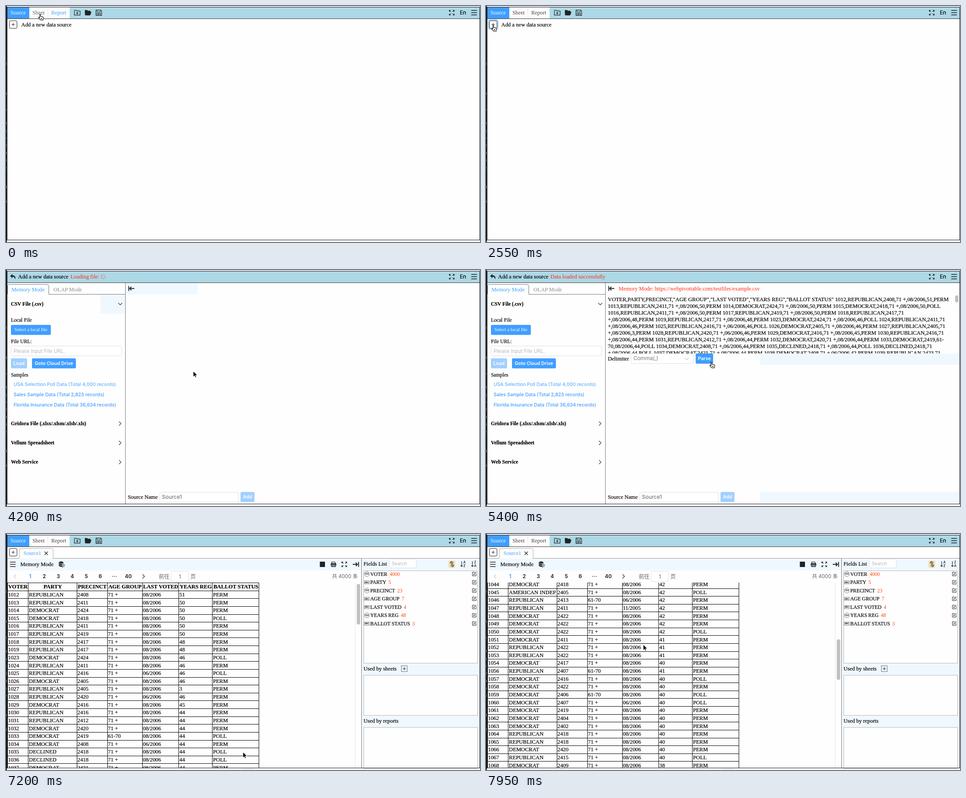
These frames come from a looping animation (1058 px wide and 529 px high, 8 s). An HTML page:

```html
<!DOCTYPE html>
<html lang="en">
<head>
<meta charset="utf-8">
<style>
html, body { margin: 0; width: 100%; height: 100%; overflow: hidden; background: #fefefe; }
#stage { display: block; width: 100vw; height: 100vh; font-family: 'Liberation Serif', 'Times New Roman', serif; }
text { white-space: pre; }
text:not([fill]) { stroke: #000; stroke-width: .2px; }
tspan { stroke: none; }
.sans { font-family: Inter, 'Noto Sans CJK SC', 'Noto Sans CJK JP', 'Noto Sans CJK', sans-serif; }
</style>
</head>
<body>
<svg id="stage" viewBox="0 0 1058 529"></svg>
<script>
const LOOP = 8000, STEP = 150, ROW = 17.63;
const BLUE = '#409eff', PALE = '#a0cfff', RED = '#ff2a10', ALICE = '#f0f8ff', INK = '#222', GREY = '#dcdfe6';
const stage = document.getElementById('stage');

// ---- data: party, precinct, flags (a: 61-70, s: June, n: November, L: poll), years
const PARTY = { R: 'REPUBLICAN', D: 'DEMOCRAT', C: 'DECLINED', A: 'AMERICAN INDEP' };
const HEADS = ['VOTER', 'PARTY', 'PRECINCT', 'AGE GROUP', 'LAST VOTED', 'YEARS REG', 'BALLOT STATUS'];
const COLS = [0, 46.5, 155, 223, 301, 382.5, 457.5, 561.5];
const rows = ('R08P51 R11P50 D24P50 D18L50 R11P50 R19P50 R17P48 R17P48 D24L46 R11P46 R16sL46 D05P46 R05P3 R20sP46 ' +
  'D16P45 R16P44 R12P44 D20P44 D19aL44 D08sP44 C18L44 C18L44 D21P44 D08sP42 R23P42 D22P42 R11P42 D17P42 R08P42 ' +
  'D18P42 A05L42 R13asP42 R11nP42 D22P42 D22P42 D22L42 D11P41 R22P41 R22P41 D17P40 R07aP41 D16L40 D22P40 D06aL40 ' +
  'D07sL40 D19P40 D04P40 D02P40 R18P40 R18P40 D20P40 R15L40 D09P38 R12P38').split(' ').map((code, i) => {
  const [, party, precinct, flags, years] = code.match(/(\w)(\d\d)(\D+)(\d+)/);
  const has = f => flags.includes(f);
  return [1012 + i + (i > 7 ? 3 : 0) + (i > 39 ? 1 : 0), PARTY[party], '24' + precinct, has('a') ? '61-70' : '71 +',
    has('n') ? '11/2005' : has('s') ? '06/2006' : '08/2006', years, has('L') ? 'POLL' : 'PERM'];
});
const csvLines = (HEADS.map(h => h.includes(' ') ? `"${h}"` : h).join() + rows.slice(0, 28).map(row => {
  const [id, party, precinct, age, ...rest] = row;
  const wrapped = [1018, 1024, 1027, 1030, 1033, 1036, 1039].includes(id);
  const group = wrapped ? age.replace(/ |(?<=-)/, '\n') : age;
  return ([1013, 1016].includes(id) ? '\n' : ' ') + [id, party, precinct, group, ...rest].join();
}).join('')).split('\n').slice(0, 9);

// ---- drawing helpers; text y is the middle of the line
const text = (x, y, s, o = '', size = 12.32) =>
  `<text x="${x}" y="${y + size * .33}" ${o} font-size="${size}">${s}</text>`;
const sans = (x, y, s, o = '', size = 10.5) => text(x, y, s, 'class="sans" ' + o, size);
const rect = (x, y, w, h, fill, o = '') =>
  `<rect x="${x}" y="${y}" width="${w}" height="${h}" fill="${fill}" ${o}/>`;
const line = (x, y, w, h, fill = '#333') => rect(x, y, w, h, fill, 'shape-rendering="crispEdges"');
const path = (x, y, d, o = '') =>
  `<path transform="translate(${x} ${y})" d="${d}" ${o} fill="none" stroke="${INK}" stroke-width="1.2"/>`;
const field = (x, y, w, h, stroke = GREY) => rect(x + .5, y + .5, w - 1, h - 1, '#fff', `rx="3" stroke="${stroke}"`);
const mid = 'text-anchor="middle" ';
const fill = c => `fill="${c}" `;
const button = (x, y, w, s, color = BLUE, h = 22.5) =>
  rect(x, y, w, h, color, 'rx="2.5"') + sans(x + w / 2, y + h / 2, s, mid + fill('#fff') + 'font-weight="600"');
const chevron = (x, y, turn = 0, color = INK) =>
  `<path transform="translate(${x} ${y}) rotate(${turn})" d="M-2.2 -4.5L2.2 0L-2.2 4.5" fill="none" stroke="${color}" stroke-width="1.1"/>`;
const burger = (x, y) => path(x, y, 'M0 -5H12.5M0 0H12.5M0 5H12.5', 'stroke-width="1.5"');
const expand = (x, y) => path(x, y, 'M-2 -2L-5.5 -5.5M-5.5 -2.5V-5.5H-2.5M2 -2L5.5 -5.5M2.5 -5.5H5.5V-2.5M-2 2L-5.5 5.5M-5.5 2.5V5.5H-2.5M2 2L5.5 5.5M2.5 5.5H5.5V2.5');
const plus = (x, y) => path(x, y, 'M-3.5 0H3.5M0 -3.5V3.5', 'stroke-width="1"');
const clamp = v => Math.max(0, Math.min(1, v));
const ease = v => (v = clamp(v), v * v * (3 - 2 * v));

function table(x, top, bottom, scroll) {
  const h = bottom - top;
  let out = '';
  for (let r = 0; r <= rows.length; r++) {
    const y = r * ROW - scroll;
    if (y < -ROW || y > h) continue;
    out += line(0, Math.round(y), 562, 1, '#000');
    HEADS.forEach((head, c) => out += r
      ? text(COLS[c] + 1.5, y + 9.2, rows[r - 1][c])
      : text((COLS[c] + COLS[c + 1] + 1) / 2, y + 9.2, head, mid + 'font-weight="700"'));
  }
  COLS.forEach(c => out += line(Math.floor(c), 0, 1, h, '#000'));
  return `<svg x="${x}" y="${top}" width="563" height="${h}">${out}</svg>`;
}

function pager(x, y) {
  const marks = ['1', '2', '3', '4', '5', '6', '···', '40'];
  return chevron(x, y, 180, '#c0c4cc') + chevron(x + 287, y) + marks.map((s, i) =>
    sans(x + 34 + 31.3 * i, y, s, mid + 'font-weight="700" ' + fill(i ? '#303133' : BLUE), 11.44)).join('');
}

function header() {
  return rect(3, 3, 1054, 25, '#add8e6') + line(3, 28, 1054, 1) + expand(995, 15) +
    sans(1013, 15, 'En', '', 11.8) + burger(1038.5, 15);
}

function mainBar(sheetColor = '#444', reportColor = '#444') {
  return header() + rect(3, 3, 49, 25, BLUE) + rect(52, 3, 90, 25, '#fefefe') + line(93, 3, 1, 25, GREY) +
    text(10, 15, 'Source', fill('#fff')) + text(59, 15, 'Sheet', fill(sheetColor)) + text(101, 15, 'Report', fill(reportColor)) +
    path(152, 9, 'M.6 1.5Q.6 .6 1.5 .6H5L6.5 2.2H13.5V11.4H.6ZM4.2 6.8H10M7.1 4V9.7') +
    path(176, 9, 'M.6 10V.8H5L6.5 2.3H12V4.5H4L1.2 11.4H11.4L14 4.8H4', `fill="${INK}"`) +
    path(200, 8.5, 'M.6 1.5Q.6 .6 1.5 .6H11.5L13.6 2.7V12.6H.6ZM3 .8V4.5H10.7V.8M3 12.5V7.3H11.2V12.5M5 9H9M5 10.8H9', 'stroke-width="1.1"');
}

const addButton = (focus, y = 41.5) =>
  (focus ? rect(5.5, y - 10.5, 21, 20.5, 'none', 'rx="4" stroke="#a8cbf5" stroke-width="2.5"') : '') +
  rect(7.5, y - 8.5, 17, 17, '#fefefe', `rx="2.5" stroke="${INK}"`) + plus(16, y);

function startPage(t) {
  const overSheet = t >= 150 && t < 600;
  return mainBar(overSheet ? BLUE : t < 150 ? '#606266' : '#444', t < 150 ? BLUE : '#444') +
    addButton(t >= 2250) + text(34, 41.5, 'Add a new data source');
}

function samplePanel(t) {
  const open = ease((t - 3150) / 450), h = 225 * open;
  const body = text(11, 112.5, 'Local File', '', 11.44) + rect(11, 123, 89, 22.5, BLUE, 'rx="2.5"') +
    text(55.5, 134, 'Select a local file', mid + fill('#fff') + 'font-weight="500"', 10.56) +
    text(11, 160, 'File URL:', '', 11.44) + field(11, 170, 247.5, 23) +
    sans(17, 182, 'Please input File URL.', fill('#b4b8c0'), 11.2) +
    button(11, 198, 36, 'Load', PALE) + button(58, 198, 98, 'Goto Cloud Drive') +
    text(11, 235, 'Samples', '', 11.44) +
    ['USA Selection Poll Data (Total 4,000 records)', 'Sales Sample Data (Total 2,823 records)',
      'Florida Insurance Data (Total 36,634 records)'].map((s, i) => sans(17, 256.5 + 22.8 * i, s,
      'font-weight="500" ' + fill(!i && t >= 3600 && t < 5550 ? '#66b1ff' : BLUE), 10.56)).join('');
  const sections = ['Gridora File (.xlsx/.xlsm/.xlsb/.xls)', 'Vellum Spreadsheet', 'Web Service'];
  return text(11, 76, 'CSV File (.csv)', 'font-weight="700"', 11.44) + chevron(255, 76, 90 * open) +
    `<svg x="0" y="98" width="266" height="${h}" viewBox="0 98 266 ${h || 1}">${h ? body : ''}</svg>` +
    sections.map((s, i) => text(11, 119.3 + h + 43.2 * i, s, 'font-weight="700"', 11.44) +
      chevron(254.5, 119.3 + h + 43.2 * i)).join('');
}

function spinner(x, y, t) {
  let out = '';
  for (let i = 0; i < 8; i++) out += `<path transform="translate(${x} ${y}) rotate(${i * 45 + t * .18})" d="M0 -2.8V-5.5" stroke="${RED}" stroke-opacity="${.5 + i / 16}"/>`;
  return out;
}

function loadPage(t) {
  const loading = t >= 3900 && t < 4650, loaded = t >= 4650, parsed = t >= 5700;
  let out = header() + path(9, 9, 'M5 .5L.8 4.5L5 8.5V6Q10.5 5.5 11.5 11Q13 3.3 5 3.2Z', `fill="${INK}" stroke-width=".8"`) +
    text(27, 15, 'Add a new data source');
  if (loading) out += text(144, 15, 'Loading file:', fill(RED)) + spinner(217, 15, t - 4200);
  if (loaded && !parsed) out += text(144, 15, 'Data loaded successfully', fill(RED));
  if (t >= 4200 && !loaded) out += rect(211, 55, 55, 43, ALICE) + rect(268, 29, 160, 25.5, ALICE);
  if (loaded && !parsed) out += rect(612, 187, 445, 26, ALICE) + rect(612, 497, 445, 23, ALICE);
  out += line(95, 54, 172, 1, '#777') + line(266, 29, 1, 495, '#777') +
    path(0, 0, 'M3.5 54V36Q3.5 32.5 7 32.5H92Q95.5 32.5 95.5 36V54', 'stroke="#777" stroke-width="1"') +
    text(12, 44, 'Memory Mode', fill(BLUE)) + text(106, 44, 'OLAP Mode', fill('#8a8a8a')) + samplePanel(t) +
    path(273, 36, 'M1 0V11M13.5 5.5H3M7 1.5L3 5.5L7 9.5', 'stroke-width="1.8"');
  if (loaded) {
    out += text(296, 42, 'Memory Mode: https://webpivottable.com/testfiles/example.csv', fill(RED)) +
      `<svg x="268" y="55" width="778" height="132" viewBox="268 55 778 132">${csvLines.map((s, i) => text(272, 66.3 + 15 * i, s)).join('')}</svg>` +
      rect(1047, 57, 7.5, 15.5, '#c1c1c1', 'rx="3.5"') + text(272, 198.5, 'Delimiter') + field(323, 187, 140.5, 23) +
      sans(329, 198.5, 'Comma(,)', fill('#777'), 11.9) + chevron(448, 199, 90, '#c0c4cc') +
      button(468, 187, 39, 'Parse', parsed ? PALE : BLUE, 23);
  }
  if (parsed) out += sans(272, 227, '共 4000 条', fill('#606266'), 11.2) + pager(345, 227) + table(267.5, 242, 497, 0) +
    rect(1047, 244, 7.5, 32, '#c1c1c1', 'rx="3.5"');
  return out + text(272, 509, 'Source Name') + field(343, 497.5, 176.5, 23) +
    (t >= 3900 ? sans(348, 509, 'Source1', fill('#606266'), 12) : '') + button(523.5, 497.5, 31, 'Add', parsed ? BLUE : PALE);
}

function fieldsPanel() {
  const arrow = 'M3 0V12M.5 9.5L3 12L5.5 9.5';
  const box = (y, h) => rect(798.5, y + .5, 254, h, '#fefefe', 'stroke="#b8b8b8"');
  const sorter = (x, a, b) => path(x, 61, arrow) + sans(x + 7, 64, a, '', 7) + sans(x + 7, 72, b, '', 7);
  const counts = [4000, 5, 23, 7, 4, 48, 3];
  let out = rect(794, 55, 263, 469, ALICE) + line(793, 55, 1, 469, '#777') + text(798, 67, 'Fields List') +
    field(855, 56, 61.5, 20.5) + sans(861, 66.5, 'Search', fill('#b4b8c0'), 10.3) +
    rect(987.5, 60, 15, 15.5, '#f5deb3') + path(990, 61.5, 'M4 12V0L.8 4M7 0V12L10.2 8') +
    sorter(1014, 'A', 'Z') + sorter(1038, 'Z', 'A') + box(82, 207) + box(316, 90) + box(433, 92) +
    text(798, 301.5, 'Used by sheets') + rect(882.5, 295.5, 13, 13, 'none', `stroke="${INK}" stroke-dasharray="2 1.3"`) + plus(889, 302) +
    text(798, 419, 'Used by reports');
  HEADS.forEach((head, i) => {
    const y = 89.8 + 18.5 * i, number = [0, 2, 5].includes(i);
    out += (number ? `<circle cx="805.5" cy="${y}" r="5.5" fill="none" stroke="#555" stroke-width=".8"/>`
      : rect(800, y - 3.5, 11, 7, 'none', 'stroke="#555" stroke-width=".8"')) +
      sans(805.5, y, number ? '123' : 'abc', mid, 4.8) +
      text(813, y, `${head}<tspan dx="5" fill="#ff4500">${counts[i]}</tspan>`, '', 11.44) +
      path(1040.5, y - 5, 'M5.5 .8H.6V9H8.8V4.5M3.2 6.5L3.5 4.8L8 .3L9.3 1.6L4.8 6.1Z', 'stroke-width="1"');
  });
  return out;
}

function sourcePage(t) {
  const scroll = 534 * clamp((t - 7300) / 650);
  return mainBar() + addButton(false, 41) + rect(3, 55, 790, 26.5, ALICE) +
    line(3, 54, 26, 1, '#999') + line(105, 54, 952, 1, '#999') +
    path(0, 0, 'M29.5 54.5V36Q29.5 32.5 33 32.5H101.5Q105 32.5 105 36V54.5', 'stroke="#aaa" stroke-width="1"') +
    text(39, 43.5, 'Source1', fill(BLUE), 12.1) + path(86, 39.5, 'M0 0L7.5 7.5M7.5 0L0 7.5') +
    burger(9, 68) + text(32, 68, 'Memory Mode') +
    path(118.5, 61.5, 'M0 2Q4.5 -1.2 9 2V5.5H6V11.5Q2 11.5 0 9.5Z', `fill="${INK}"`) +
    path(118.5, 61.5, 'M0 3.8Q4.5 6 9 3.8M0 7.4Q3 9 6 8.4', 'stroke="#f0f8ff" stroke-width=".9"') +
    path(125, 68.5, 'M0 1.5H5.5L4 0M5.5 4.5H0L1.5 6', 'stroke-width="1.1"') +
    rect(700.5, 62, 11.5, 12, INK) +
    path(725, 62, 'M2 4V.8H8.5L10 2.3V4M.6 4.5H11.4V9H.6ZM2 9V11.4H10V9', 'stroke-width="1.3"') + rect(726, 66.5, 10, 2.5, INK) +
    expand(755, 68) + path(774, 62.5, 'M13 0V11M0 5.5H10.5M6.5 1.5L10.5 5.5L6.5 9.5', 'stroke-width="1.8"') +
    pager(20, 95) + sans(341, 96.5, '前往', fill('#606266'), 12) + field(368, 83, 39.5, 24) +
    sans(388, 96, '1', mid + fill('#606266'), 11.4) + sans(411.5, 96.5, '页', fill('#606266'), 12) +
    sans(728, 95, '共 4000 条', fill('#606266'), 11.2) + table(3, 109, 524, scroll) +
    line(779, 110, 1, 414, '#e4e4e4') + rect(783, 112 + scroll * .2322, 7.5, 91, '#c1c1c1', 'rx="3.7"') +
    fieldsPanel() + rect(525, 526, 29, 3, '#ececec', 'rx="1.5"');
}

// ---- pointer: time, x, y of the tip
const TRACK = [[300, 76, 18], [750, 40, 22], [900, 40, 22], [1950, 16, 43], [2700, 16, 43], [3000, 110, 76], [3300, 110, 76],
  [3600, 130, 256], [3750, 130, 256], [4050, 380, 231], [4200, 418, 227], [4500, 418, 227], [5250, 503, 206], [5550, 503, 206],
  [6150, 539, 417], [6600, 537, 511], [6750, 537, 511], [7200, 529, 489], [7500, 351, 248]];

function pointer(t) {
  const next = TRACK.findIndex(k => k[0] > t);
  const b = TRACK[next < 0 ? TRACK.length - 1 : next], a = TRACK[next < 0 ? TRACK.length - 1 : Math.max(0, next - 1)];
  const u = a === b ? 0 : ease((t - a[0]) / (b[0] - a[0]));
  const x = a[1] + (b[1] - a[1]) * u, y = a[2] + (b[2] - a[2]) * u;
  const hand = t < 2700 || t >= 3000 && t < 3900 || t >= 5250 && t < 5700 || t >= 6600 && t < 6750;
  return hand
    ? path(x - 3.8, y, 'M3 1.5C3 -.2 5.2 -.2 5.2 1.5V5.2L10 6.4Q11.8 7 11.5 9L10.6 13.5H4.8L.7 8.8C-.2 7.5 1.2 6.3 2.2 7.3L3 8.2ZM6 9V11.5M8 9V11.5', 'fill="#fff" stroke="#000" stroke-width="1.1"')
    : path(x, y, 'M0 0V12.5L2.9 9.8L4.9 14L6.9 13.1L5 9H9Z', 'fill="#000" stroke="#fff" stroke-width=".8"');
}

function edges() {
  const marks = [[129, '#888'], [196, '#999'], [232, '#777'], [262, '#999'], [280, '#888'], [296, '#2b78b8'], [312, '#888'],
    [329, '#999'], [346, '#777'], [362, '#3c7a34'], [405, '#b8b020'], [438, '#999']];
  return line(0, 0, 2, 529, '#1e1e1e') + marks.map(([y, c]) => line(0, y - 2, 1, 5, c)).join('') +
    line(2, 2, 1056, 1, '#111') + line(2, 2, 1, 523, '#111') + line(1057, 2, 1, 523, '#111') + line(2, 524, 1056, 1, '#111');
}

let shown = -1;
function draw(now) {
  const t = Math.floor(now % LOOP / STEP) * STEP;
  if (t !== shown) {
    shown = t;
    const page = t < 2700 ? startPage : t < 6750 ? loadPage : sourcePage;
    stage.innerHTML = rect(0, 0, 1058, 529, '#fefefe') + page(t) + edges() + pointer(t);
  }
  requestAnimationFrame(draw);
}
draw(performance.now());
</script>
</body>
</html>
```
